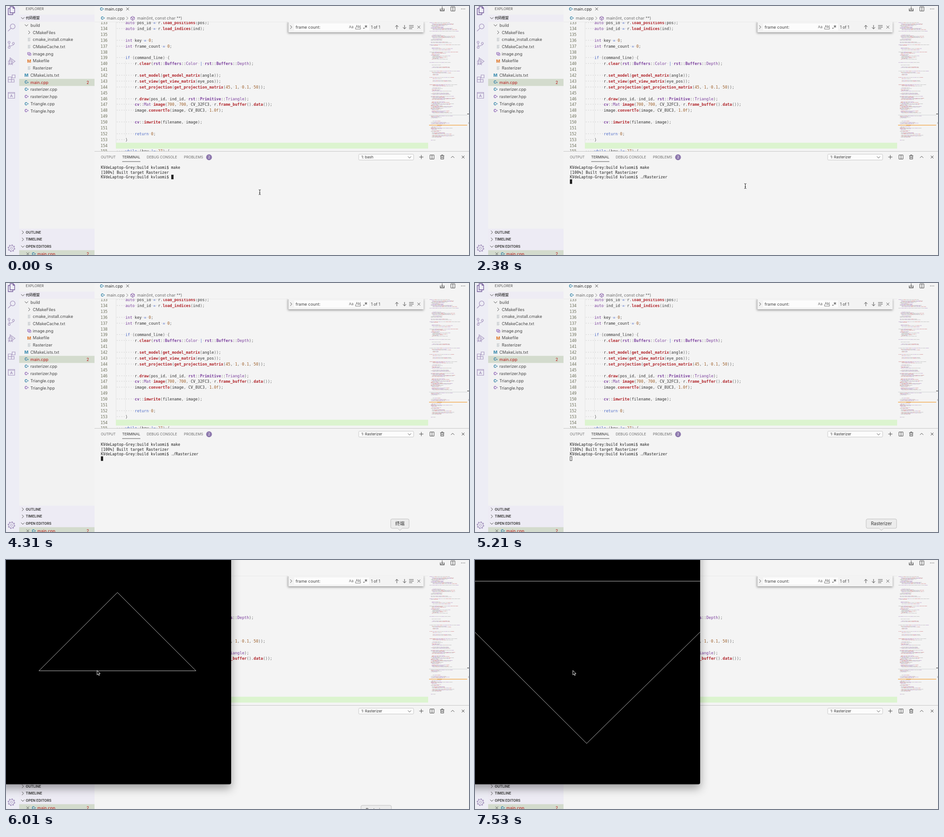
An HTML page for the animation above (8000 ms loop, 1020 by 549 pixels).

```html
<!DOCTYPE html>
<html lang="en">
<head>
<meta charset="utf-8">
<title>Rasterizer demo</title>
<style>
  html, body { margin: 0; width: 100%; height: 100%; overflow: hidden; background: #f4f4f4; }
  svg { display: block; width: 1020px; height: 549px; }
  text { font-family: Inter, 'Noto Sans CJK SC', 'Noto Sans CJK', sans-serif; }
  .mono { font-family: 'DejaVu Sans Mono', monospace; }
</style>
</head>
<body>
<svg id="stage" viewBox="0 0 1020 549" xmlns="http://www.w3.org/2000/svg"></svg>
<script>
const LOOP = 8000;
const PURPLE = '#7a3e9d', RED = '#b0242a', BLUE = '#4b69c6', BROWN = '#9c5d27', ICON = '#484848';
const ACTIVE = '#705697', IDLE = '#a898c0', ERROR = '#b81818';

// Markup helpers
const rect = (x, y, w, h, fill, more = '') =>
  `<rect x="${x}" y="${y}" width="${w}" height="${h}" fill="${fill}" ${more}/>`;
const label = (x, cy, str, size = 9.1, fill = '#484848', more = '') =>
  `<text x="${x}" y="${cy + size * 0.36}" font-size="${size}" fill="${fill}" ${more}>${str}</text>`;
const icon = (x, y, d, stroke = ICON, width = 1) =>
  `<path transform="translate(${x} ${y})" d="${d}" fill="none" stroke="${stroke}" stroke-width="${width}"/>`;

const RIGHT = 'M-1.8-3.6L1.8 0-1.8 3.6', DOWN = 'M-3.6-1.8L0 1.8 3.6-1.8', UP = 'M-3.6 1.8L0-1.8 3.6 1.8';
const CROSS = 'M-3-3L3 3M3-3L-3 3';
const SPLIT = 'M-4.5-4.5H4.5V4.5H-4.5ZM0-4.5V4.5';

const cppIcon = (x, y, color) =>
  label(x - 4, y, 'C', 8.5, color, 'font-weight="800"') + label(x + 1.3, y, '+', 6, color, 'font-weight="800"');
const letterIcon = (x, y, color) => label(x, y, 'M', 9.5, color, 'font-weight="800" text-anchor="middle"');
const linesIcon = (x, y) => icon(x, y, 'M-3-3H3M-3-1H1.5M-3 1H3M-3 3H2', '#a9b0b4', 0.8);
const imageIcon = (x, y) => icon(x, y, 'M-3.5-3H2V1.5H-3.5ZM2-1H4V3.5H-1V1.5M-2.5 0L-1-1.5 1 1', '#9068b8', 1);

function activityBar() {
  return rect(0, 0, 29, 549, '#ededf5') +
    icon(12, 10, 'M-3-8.5H4L7-5.5V5H-3ZM3.5-8.5V-5H7M-3-4.5H-7V9H3V5', ACTIVE, 1.3) +
    icon(12, 47, 'M8-2A5.3 5.3 0 1 1-2.6-2 5.3 5.3 0 1 1 8-2M-1 2L-7.5 8.5', IDLE, 1.3) +
    icon(12, 85, 'M-3-5A2.2 2.2 0 1 1-3-5.1M-5-3V4M-2.8 6.3A2.2 2.2 0 1 1-2.8 6.2M6.5-2.5A2.2 2.2 0 1 1 6.5-2.6M4.3 0C4 3-2 2-5 4', IDLE, 1.2) +
    icon(12, 122, 'M-3-1V-8L8 0 0 5.5M-5-1A3 3 0 0 1 1-1V4A3 3 0 0 1-5 4ZM-8 0H4M-8 4H4M-7 8L-5 6M3 8L1 6', IDLE, 1.1) +
    icon(12, 160, 'M-7-3.5H0V8H-7ZM-7 2.2H6V8H0M1.5-8H8V-1.5H1.5Z', IDLE, 1.2) +
    icon(12, 197, 'M-7-6.5H7V6.5H-7ZM-7-4.5H7M-2.5 4L0-1.5 2.5 4M-1.5 2H1.5', IDLE, 1.2) +
    `<g transform="translate(12 534)" fill="none" stroke="${IDLE}">
       <circle r="6" stroke-width="1.2"/><circle r="2.4"/>
       <circle r="7.3" stroke-width="2" stroke-dasharray="2.9 2.83"/></g>`;
}

function sidebar() {
  const files = [
    ['CMakeFiles', (x, y) => icon(x, y, RIGHT)],
    ['cmake_install.cmake', linesIcon], ['CMakeCache.txt', linesIcon], ['image.png', imageIcon],
    ['Makefile', (x, y) => letterIcon(x, y, '#e0803a')], ['Rasterizer', linesIcon],
    ['CMakeLists.txt', (x, y) => letterIcon(x, y, '#4a94b4')],
    ['main.cpp'], ['rasterizer.cpp'], ['rasterizer.hpp'], ['Triangle.cpp'], ['Triangle.hpp'],
  ];
  const section = (y, name, chevron) => icon(37, y, chevron) + label(43.5, y, name, 7.7, '#444', 'font-weight="700"');
  let out = rect(29, 0, 166, 549, '#f2f2f2') + rect(29, 19, 166, 15.7, '#eeecf4') +
    rect(29, 491, 166, 58, '#edebf4') + rect(29, 160.6, 166, 15.7, '#d3dbcd') + rect(29, 538.4, 166, 11, '#d3dbcd') +
    label(43.5, 6.5, 'EXPLORER', 7.8, '#555') + section(26.7, '代码框架', DOWN) +
    icon(45, 42.5, DOWN) + label(54, 42.5, 'build');
  files.forEach(([name, draw], i) => {
    const y = 42.5 + 15.73 * (i + 1), nested = i < 6, current = name === 'main.cpp';
    const glyph = draw || ((x, cy) => cppIcon(x, cy, name.endsWith('hpp') ? '#9068b8' : '#3d88aa'));
    out += glyph(nested ? 51 : 45, y) + label(nested ? 59 : 53.7, y, name, 9.1, current ? ERROR : undefined);
    if (current) out += label(177.5, y, '2', 8.8, ERROR);
  });
  return out + section(499, 'OUTLINE', RIGHT) + section(514.6, 'TIMELINE', RIGHT) + section(530.3, 'OPEN EDITORS', DOWN) +
    icon(48, 546.5, CROSS, '#555') + cppIcon(61, 546.5, '#3d88aa') +
    label(69, 546.5, 'main.cpp', 9.1, ERROR) + label(177.5, 546.5, '2', 8.8, ERROR);
}

const CODE = `    auto pos_id = r.load_positions(pos);
    auto ind_id = r.load_indices(ind);

    int key = 0;
    int frame_count = 0;

    if (command_line) {
        r.clear(rst::Buffers::Color | rst::Buffers::Depth);

        r.set_model(get_model_matrix(angle));
        r.set_view(get_view_matrix(eye_pos));
        r.set_projection(get_projection_matrix(45, 1, 0.1, 50));

        r.draw(pos_id, ind_id, rst::Primitive::Triangle);
        cv::Mat image(700, 700, CV_32FC3, r.frame_buffer().data());
        image.convertTo(image, CV_8UC3, 1.0f);

        cv::imwrite(filename, image);

        return 0;
    }

    while (key != 27) {`.split('\n');

function highlight(line) {
  let previous = '';
  return line.replace(/\s|\d[\d.]*f?|\w+|::|[^\w\s]/g, (token, at) => {
    const rest = line.slice(at + token.length);
    let fill = '#333', bold = false;
    if (token === ' ') { token = '·'; fill = '#bdbdbd'; }
    else if (/^\d/.test(token)) fill = BROWN;
    else if (/^(if|return|while)$/.test(token)) fill = BLUE;
    else if (/^(auto|int)$/.test(token)) fill = PURPLE;
    else if (/^\w/.test(token)) {
      if (rest.startsWith('::')) { fill = PURPLE; bold = true; }
      else if (rest[0] === '(') { fill = RED; bold = true; }
      else if (previous === '::') fill = PURPLE;
    } else fill = /[=|!]/.test(token) ? BLUE : '#666';
    previous = token;
    return `<tspan fill="${fill}"${bold ? ' font-weight="700"' : ''}>${token}</tspan>`;
  });
}

function editor() {
  const rows = CODE.map((line, i) => {
    const y = 40.1 + 12.88 * i;
    return `<text class="mono" font-size="8.54" x="208.3" y="${y}" fill="#6d705b">${133 + i}</text>` +
      `<text class="mono" font-size="8.54" x="242.4" y="${y}">${highlight(line)}</text>`;
  }).join('');
  return rect(195, 0, 825, 549, '#f4f4f4') + rect(195, 34.6, 735, 1, '#e9e9e9') +
    cppIcon(211, 6.5, '#3d88aa') + label(217.7, 6.5, 'main.cpp', 9.1, '#333') + icon(268, 6.5, CROSS) +
    cppIcon(213, 27, '#3d88aa') + label(222, 27, 'main.cpp', 9.1, '#6c6c6c') + icon(267, 27, RIGHT, '#777', 0.9) +
    icon(279, 27, 'M0-4.3L4-2V2.2L0 4.5-4 2.2V-2ZM-4-2L0 0 4-2M0 0V4.5', '#7b4fa0') +
    label(289, 27, 'main(int, const char **)', 9, '#6c6c6c') +
    icon(961, 6.5, 'M-4.5-1V4.5H4.5V-1M-4.5 2.5H4.5M0-5.5V1M-2.5-1.5L0 1 2.5-1.5') + icon(984.5, 6.5, SPLIT) +
    [1003.5, 1007, 1010.5].map(x => `<circle cx="${x}" cy="6.5" r="0.8" fill="${ICON}"/>`).join('') +
    `<g clip-path="url(#codeArea)">${rect(242, 301.5, 688, 12.9, '#dcf4cf')}` +
    rect(242.2, 35, 0.7, 266.5, '#dcdcdc') + rect(262.8, 121, 0.7, 167, '#dcdcdc') + `${rows}</g>`;
}

function minimap() {
  // Top and bottom of each paragraph of tiny code
  const paragraphs = [[36, 52], [55, 81], [85, 97], [101, 117], [124, 137], [143, 152],
    [157, 166], [173, 208], [211, 238], [242, 260], [266, 290], [295.5, 296]];
  let seed = 7, out = '';
  const random = () => (seed = seed * 16807 % 2147483647) / 2147483647;
  for (const [top, bottom] of paragraphs) {
    for (let y = top; y < bottom; y += 1.43) {
      const heading = y === top && y < 180;
      if (!heading && y !== top && random() < 0.3) continue;
      const start = 933 + (heading ? 0 : 3 + Math.floor(random() * 3) * 2);
      const end = start + (y > 295 ? 6 : heading ? 45 + 20 * random() : 9 + 40 * random());
      for (let x = start; x < end;) {
        const width = 1.5 + 6 * random(), hue = random();
        out += rect(x, y, width, 0.75, hue < 0.3 ? PURPLE : hue < 0.58 ? RED : '#777', 'opacity="0.5"');
        x += width + 0.8;
      }
    }
  }
  return out + rect(932, 240.2, 84, 0.8, '#c9ced0') + rect(932, 262, 84, 1.4, '#f1a94e') + rect(950, 262, 10, 1.4, '#d88420') +
    rect(1016, 237.4, 4, 1.4, '#555') + rect(1018.5, 256, 1.5, 4, '#bbb');
}

function findBox() {
  return `<g filter="url(#softShadow)">${rect(621, 34, 299, 24, '#f3f3f3')}</g>` + rect(621, 36, 1.6, 22, '#c8c8c8') +
    rect(635, 38.5, 165, 15.5, '#fcfcfc') + icon(628, 46.5, RIGHT) + label(638, 46.5, 'frame count:', 9.1, '#444') +
    label(755.5, 46.5, 'Aa', 8, '#666') + label(770.5, 45.5, 'Abl', 7.2, '#555') + icon(775.5, 46.5, 'M-5.5 1V4.5H5.5V1', '#666', 0.9) +
    rect(787.5, 48, 2, 2, '#555') + icon(793, 45, 'M0-3V3M-2.6-1.5L2.6 1.5M-2.6 1.5L2.6-1.5', '#555') +
    label(804, 46.8, '1 of 1', 8.6, '#444') +
    icon(861, 46.5, 'M0 4.5V-4M-3.6-.4L0-4 3.6-.4') + icon(878, 46.5, 'M0-4.5V4M-3.6 .4L0 4 3.6 .4') +
    icon(893, 46.5, 'M-5-3.5H5M-5 0H5M-5 3.5H2') + icon(909.5, 46.5, CROSS);
}

function panel() {
  return rect(195, 320, 825, 229, '#f4f4f4') + rect(195, 320, 825, 1, '#c6c6c6') +
    label(209, 333.5, 'OUTPUT', 7.8, '#6c6c6c') + label(256, 333.5, 'TERMINAL', 7.8, '#333') +
    label(310, 333.5, 'DEBUG CONSOLE', 7.8, '#6c6c6c') + label(392, 333.5, 'PROBLEMS', 7.8, '#6c6c6c') +
    rect(256, 342.5, 40, 1, '#555') + '<circle cx="447.3" cy="333.5" r="6.4" fill="#8d78ad"/>' +
    label(447.3, 333.5, '2', 7.8, '#fff', 'text-anchor="middle"') +
    rect(777, 326.8, 121, 12.8, '#fcfcfc', 'rx="2" stroke="#c8c8c8"') +
    label(783, 333.5, '', 8, '#333', 'id="task"') + icon(889, 333.5, DOWN, ICON, 0.9) +
    icon(915, 333, 'M-4.5 0H4.5M0-4.5V4.5') + icon(938.5, 333, SPLIT) +
    icon(961, 333, 'M-4.5-3H4.5M-1.5-3V-4.6H1.5V-3M-3.2-3V4.5H3.2V-3M-1.2-1V2.7M1.2-1V2.7') +
    icon(984, 333, UP) + icon(1007, 333, CROSS) +
    ['one', 'two', 'three'].map((id, i) =>
      `<text id="${id}" class="mono" font-size="8.31" x="209" y="${359.4 + 10.15 * i}" fill="#1c1c1c"></text>`).join('') +
    '<rect id="caret"/>';
}

document.getElementById('stage').innerHTML = `
  <defs>
    <clipPath id="codeArea"><rect x="195" y="35" width="735" height="285"/></clipPath>
    <clipPath id="belowTabs"><rect x="600" y="35" width="340" height="60"/></clipPath>
    <clipPath id="canvasArea"><rect width="496" height="494"/></clipPath>
    <filter id="softShadow" x="-10%" y="-50%" width="120%" height="220%">
      <feDropShadow dx="0" dy="2" stdDeviation="2.6" flood-opacity="0.4"/></filter>
    <filter id="windowShadow" filterUnits="userSpaceOnUse" x="-60" y="-60" width="640" height="640">
      <feDropShadow dx="0" dy="9" stdDeviation="10" flood-opacity="0.36"/></filter>
  </defs>
  ${editor()}${minimap()}
  <g clip-path="url(#belowTabs)">${findBox()}</g>
  ${panel()}${sidebar()}${activityBar()}
  <g id="output">
    <rect x="-30" y="-30" width="526" height="524.5" rx="4" filter="url(#windowShadow)"/>
    <path id="triangle" clip-path="url(#canvasArea)" fill="none" stroke="#d2d2d2" stroke-width="0.9"/>
  </g>
  <g id="tip">
    <path id="bubble" fill="#ececec" stroke="#bababa" stroke-width="0.9"/>
    <text id="tipText" y="14.2" text-anchor="middle" fill="#333"></text>
  </g>
  <path id="beam" d="M-2.2-5.5Q0-5.3 0-4Q0-5.3 2.2-5.5M0-4V4M-2.2 5.5Q0 5.3 0 4Q0 5.3 2.2 5.5M-1.3 1.6H1.3" fill="none" stroke="#222"/>
  <path id="arrow" d="M.6.6V10.3L2.9 8.2 4.4 11.7 6 11 4.5 7.6H7.6Z" fill="#000" stroke="#fff" stroke-width="0.9"/>`;

const parts = Object.fromEntries([...document.querySelectorAll('#stage [id]')].map(node => [node.id, node]));
const set = (node, attrs) => Object.entries(attrs).forEach(([key, value]) => node.setAttribute(key, value));
const show = (node, visible) => { node.style.display = visible ? '' : 'none'; };

// Value of the last step that has begun; each step is [time, ...values]
const stepAt = (steps, t) => steps.filter(([start]) => start <= t).pop().slice(1);

const PROMPT = 'KVdeLaptop-Grey:build kvluomi$ ';
const COMMANDS = [[0, ''], [600, 'make'], [750, './Rasterizer ']];
const BEAM = [[0, 559, 410.5], [1650, 559, 410], [1790, 571.5, 396], [2380, 595.5, 397],
  [2530, 718.5, 430], [2680, 895, 526], [2820]];
const ARROW = [[0], [5660, 748.5, 484.5], [5870, 205, 244], [6010, 200, 243], [6190, 202, 242],
  [6340, 211, 243], [6480, 213, 243], [6630, 214, 243], [6780, 215, 243]];
const TIP = [[0], [2970, '终端', 866, 521], [3120, '终端', 868.5, 520.3], [4310, '终端', 867.8, 520.3],
  [4460, 'Rasterizer', 895.8, 520.3], [5210, 'Rasterizer', 895.3, 520.3], [5360, 'Rasterizer', 896.7, 520.3],
  [5870, 'Rasterizer', 827.5, 532], [6010, 'Rasterizer', 815.5, 541], [6190]];

function place(node, position) {
  show(node, position.length);
  if (position.length) node.setAttribute('transform', `translate(${position.join(' ')})`);
}

function drawTip(t) {
  const [name, ...position] = stepAt(TIP, t);
  place(parts.tip, position);
  if (!name) return;
  const wide = name === 'Rasterizer', half = wide ? 33.5 : 20.2, side = half - 3;
  parts.bubble.setAttribute('d', `M${-side} 0H${side}q3 0 3 3V17.5q0 3-3 3H5L0 25.5-5 20.5H${-side}q-3 0-3-3V3q0-3 3-3Z`);
  parts.tipText.textContent = name;
  parts.tipText.setAttribute('font-size', wide ? 9.7 : 10.4);
}

function render(t) {
  const [command] = stepAt(COMMANDS, t), running = t >= 1350, focused = t < 5210;
  parts.one.textContent = PROMPT + 'make';
  parts.two.textContent = '[100%] Built target Rasterizer';
  parts.three.textContent = PROMPT + command;
  parts.task.textContent = running ? '1: Rasterizer' : '1: bash';

  const inset = focused ? 0 : 0.5, column = running ? 0 : PROMPT.length + command.length;
  set(parts.caret, {
    x: 209 + column * 5.003 + inset, y: (running ? 382.2 : 372) + inset,
    width: 5 - 2 * inset, height: 10 - 2 * inset,
    fill: focused ? '#222' : 'none', stroke: focused ? 'none' : '#333', 'stroke-width': 0.9,
  });

  show(parts.output, t >= 5360);
  parts.triangle.setAttribute('d', t < 7530
    ? 'M245.5 71.5L418.5 244.3H72.5Z'
    : 'M-113 46.7H610L246 404.5Z');
  drawTip(t);
  place(parts.beam, stepAt(BEAM, t));
  place(parts.arrow, stepAt(ARROW, t));
}

const begin = performance.now();
function tick() {
  render((performance.now() - begin) % LOOP);
  requestAnimationFrame(tick);
}
render(0);
requestAnimationFrame(tick);
</script>
</body>
</html>
```
